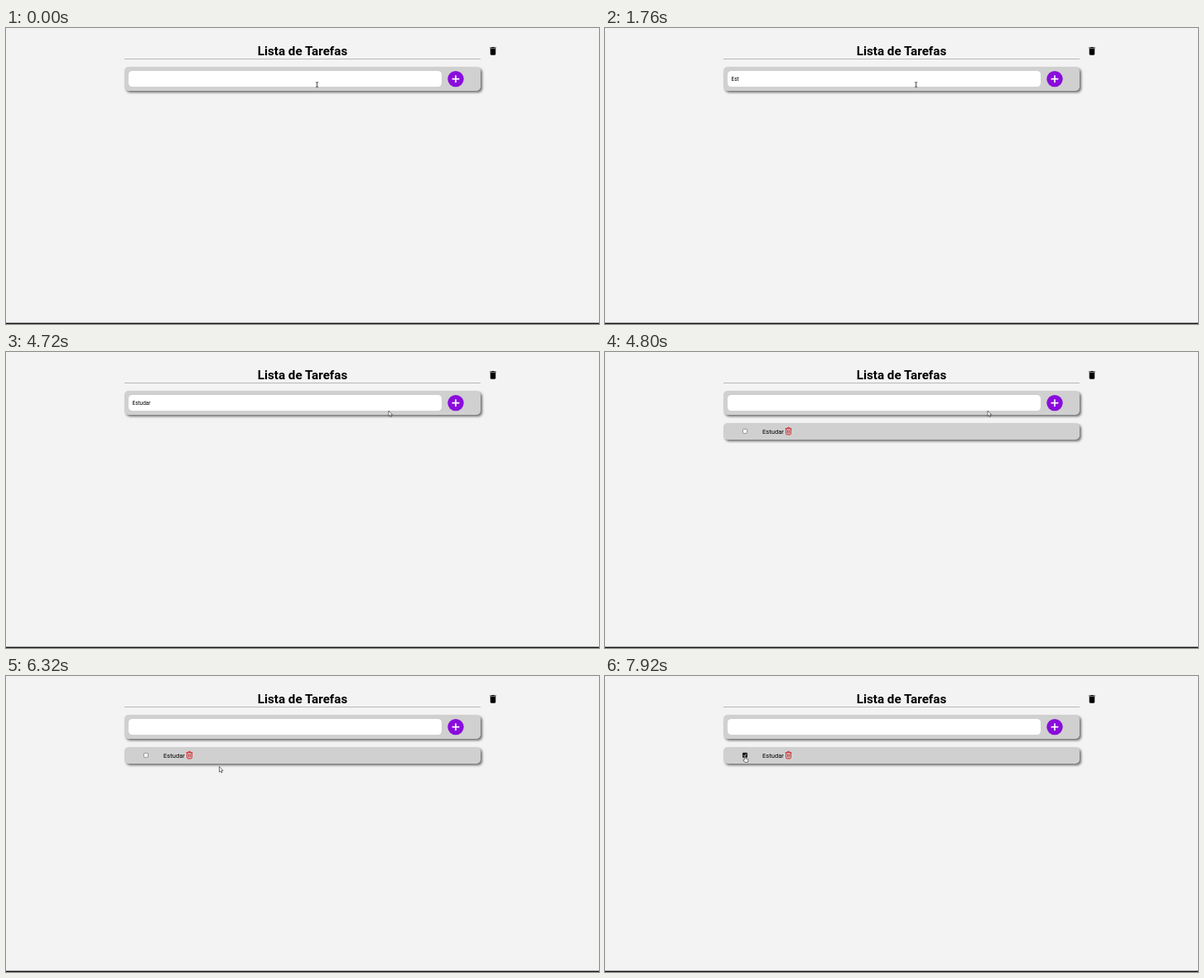
Animation, 716 px wide and 358 px high, one loop 8 s. Source, as an HTML page:

```html
<!DOCTYPE html>
<html lang="pt-BR">
<head>
<meta charset="utf-8">
<title>Lista de Tarefas</title>
<style>
  html, body { margin: 0; width: 100%; height: 100%; overflow: hidden; background: #f3f3f3; }
  svg { display: block; width: 716px; height: 358px; }
  text { font-family: Roboto, sans-serif; fill: #000; }
  .panel { fill: #d0d0d0; filter: drop-shadow(2px 2px 1.8px rgba(0, 0, 0, .55)); }
</style>
</head>
<body>
<svg viewBox="0 0 716 358">
  <rect width="716" height="358" fill="#f3f3f3"/>
  <rect y="356.6" width="716" height="1.4" fill="#151515"/>

  <text x="358" y="33.4" font-size="15.2" font-weight="700" text-anchor="middle">Lista de Tarefas</text>
  <rect x="143" y="37" width="430" height="1" fill="#b8b8b8"/>
  <path transform="translate(581.5 21.3) scale(.54)"
    d="M6 19c0 1.1.9 2 2 2h8c1.1 0 2-.9 2-2V7H6zM19 4h-3.5l-1-1h-5l-1 1H5v2h14z"/>

  <rect class="panel" x="143" y="47" width="430" height="29" rx="4.8"/>
  <rect x="148" y="52" width="378" height="19" rx="4.5" fill="#fff"/>
  <text id="entry" x="152.5" y="64.2" font-size="6.45"></text>
  <circle cx="543" cy="61.6" r="9.7" fill="#8a0cdc"/>
  <path d="M538.6 61.6h8.8M543 57.2v8.8" stroke="#fff" stroke-width="1.6"/>

  <g id="task">
    <rect class="panel" x="143" y="86" width="430" height="20" rx="4.8"/>
    <rect x="166.5" y="93.3" width="5" height="5" rx=".8" fill="#fff" stroke="#707070" stroke-width=".7"/>
    <g id="tick">
      <rect x="166" y="92.8" width="6" height="6" rx="1" fill="#181818"/>
      <path d="M167.3 95.9l1.2 1.2 2.3-2.7" fill="none" stroke="#fff" stroke-width=".8"/>
    </g>
    <text x="190" y="98.6" font-size="7.6">Estudar</text>
    <path d="M217.7 92.7h7.6M219.8 92.5q0-1.3 1.7-1.3t1.7 1.3M218.6 92.8v5.8q0 1.3 1.3 1.3h3.2q1.3 0 1.3-1.3v-5.8M220.6 94.3v4M222.4 94.3v4"
      fill="none" stroke="#d4141c" stroke-width=".9"/>
  </g>

  <path id="beam" d="M374.1 65.6h1l.5.4.5-.4h1M375.6 66v5M374.1 71.3h1l.5-.4.5.4h1"
    fill="none" stroke="#222" stroke-width=".8"/>
  <g id="pointer" fill="#fff" stroke="#222" stroke-width=".6" stroke-linejoin="round">
    <path id="arrow" d="M0 0v6.6l1.5-1.3 1 2.3 1.1-.5-1-2.2h2z"/>
    <path id="hand" d="M-.7.7q.7-1 1.4 0v2.4l2.4.5q.9.3.8 1.2l-.5 2.7h-3.6L-2.1 5q.1-1 1.4-.2z"/>
  </g>
</svg>
<script>
const LOOP = 8000, STEP = 80;
const typing = [[0, ""], [960, "E"], [1760, "Est"], [2080, "Estu"], [2560, "Estudar"], [4800, ""]];
// Pointer stops: time, x, y
const route = [
  [3680, 376, 68], [3840, 462, 71], [5680, 462, 71], [6320, 257.5, 109.5],
  [6560, 228, 98], [6880, 221, 95], [6960, 221, 95], [7600, 169, 96.8]
];
const $ = id => document.getElementById(id);
const show = (id, on) => $(id).style.display = on ? "" : "none";

function pointerAt(t) {
  const next = route.findIndex(stop => stop[0] > t);
  if (next < 0) return route.at(-1).slice(1);
  if (next === 0) return route[0].slice(1);
  const [t0, x0, y0] = route[next - 1], [t1, x1, y1] = route[next];
  const k = (t - t0) / (t1 - t0);
  return [x0 + (x1 - x0) * k, y0 + (y1 - y0) * k];
}

function draw(now) {
  const t = Math.floor(now % LOOP / STEP) * STEP;
  const [x, y] = pointerAt(t);
  const overTrash = x > 217 && x < 226 && y > 90 && y < 101;
  const overBox = x < 173;
  const moved = t >= 3760;

  $("entry").textContent = typing.findLast(([start]) => t >= start)[1];
  show("task", t >= 4800);
  show("tick", t >= 7760);
  show("beam", !moved);
  show("pointer", moved);
  show("hand", overTrash || overBox);
  show("arrow", !(overTrash || overBox));
  $("pointer").setAttribute("transform", `translate(${x} ${y})`);
}

const begin = performance.now();
(function tick() {
  draw(performance.now() - begin);
  requestAnimationFrame(tick);
})();
</script>
</body>
</html>
```
